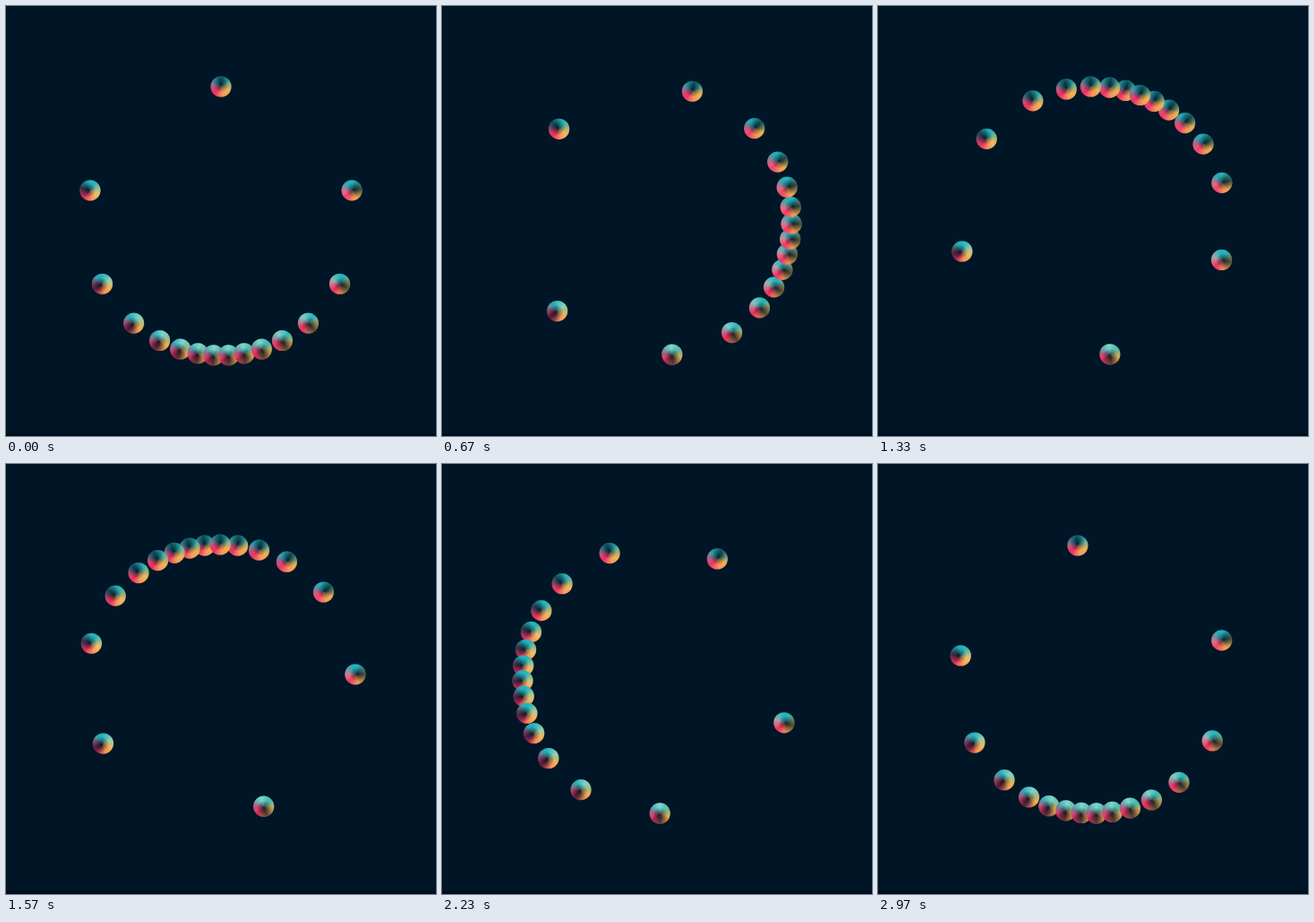
An HTML page with a canvas for the animation above (3.01 s loop, 480 by 480 pixels).

```html
<!DOCTYPE html>
<html lang="en">
<head>
<meta charset="utf-8">
<title>Orbiting beads</title>
<style>
  html, body { margin: 0; width: 100%; height: 100%; overflow: hidden; background: #001626; }
  canvas { display: block; }
</style>
</head>
<body>
<canvas id="stage" width="480" height="480"></canvas>
<script>
const ctx = document.getElementById('stage').getContext('2d');
const LOOP = 3010, BEADS = 15, ORBIT = 150, RADIUS = 11.6;
const TAU = 2 * Math.PI;
const SQUEEZE = Math.tan(Math.PI / 12);

function addStops(gradient, stops) {
  for (const [at, color] of stops) gradient.addColorStop(at, color);
  return gradient;
}

function fillDisc(style) {
  ctx.fillStyle = style;
  ctx.beginPath();
  ctx.arc(0, 0, RADIUS, 0, TAU);
  ctx.fill();
}

const hues = addStops(ctx.createConicGradient(-Math.PI / 2, 0, 0), [
  [0, '#22b4bd'], [0.1, '#2ab3b6'], [0.33, '#f3b04e'], [0.46, '#f5965a'],
  [0.62, '#ec2b60'], [0.7, '#e2406c'], [0.9, '#2aa9b5'], [1, '#22b4bd']
]);

// Angles run from the bottom of the orbit towards the right.
function drawBead(angle) {
  const dx = Math.sin(angle), dy = Math.cos(angle);
  ctx.save();
  ctx.translate(240 + ORBIT * dx, 240 + ORBIT * dy);
  fillDisc(hues);
  ctx.rotate(Math.PI / 2 - angle);

  // Dark wedge facing outwards, light facing the centre.
  const light = 0.25 + 0.2 * dy;
  fillDisc(addStops(ctx.createConicGradient(0, 0, 0), [
    [0, 'rgba(0,16,30,.62)'], [0.2, 'rgba(0,16,30,0)'],
    [0.3, 'rgba(255,255,210,0)'], [0.5, `rgba(255,255,210,${light})`],
    [0.7, 'rgba(255,255,210,0)'], [0.8, 'rgba(0,16,30,0)'],
    [1, 'rgba(0,16,30,.62)']
  ]));
  fillDisc(addStops(ctx.createRadialGradient(2, 0, 0, 2, 0, 8.5), [
    [0, 'rgba(0,16,30,.72)'], [1, 'rgba(0,16,30,0)']
  ]));
  ctx.restore();
}

function draw(now) {
  // 90 drawings per loop, each a pose picked from 150 even steps of one turn.
  const ticks = Math.floor(now % LOOP / 10);
  const step = Math.min(89, Math.floor((ticks + 0.5) * 0.3));
  const focus = Math.ceil(step * 5 / 3) / 150 * TAU;

  ctx.fillStyle = '#001626';
  ctx.fillRect(0, 0, 480, 480);
  ctx.fillStyle = '#000c1c';
  ctx.fillRect(0, 477, 480, 3);

  for (let i = 0; i < BEADS; i++) {
    const phase = Math.PI + i / BEADS * TAU - focus;
    drawBead(focus + 2 * Math.atan(SQUEEZE * Math.tan(phase / 2)));
  }
}

const start = performance.now();
function tick() {
  draw(performance.now() - start);
  requestAnimationFrame(tick);
}
tick();
</script>
</body>
</html>
```
